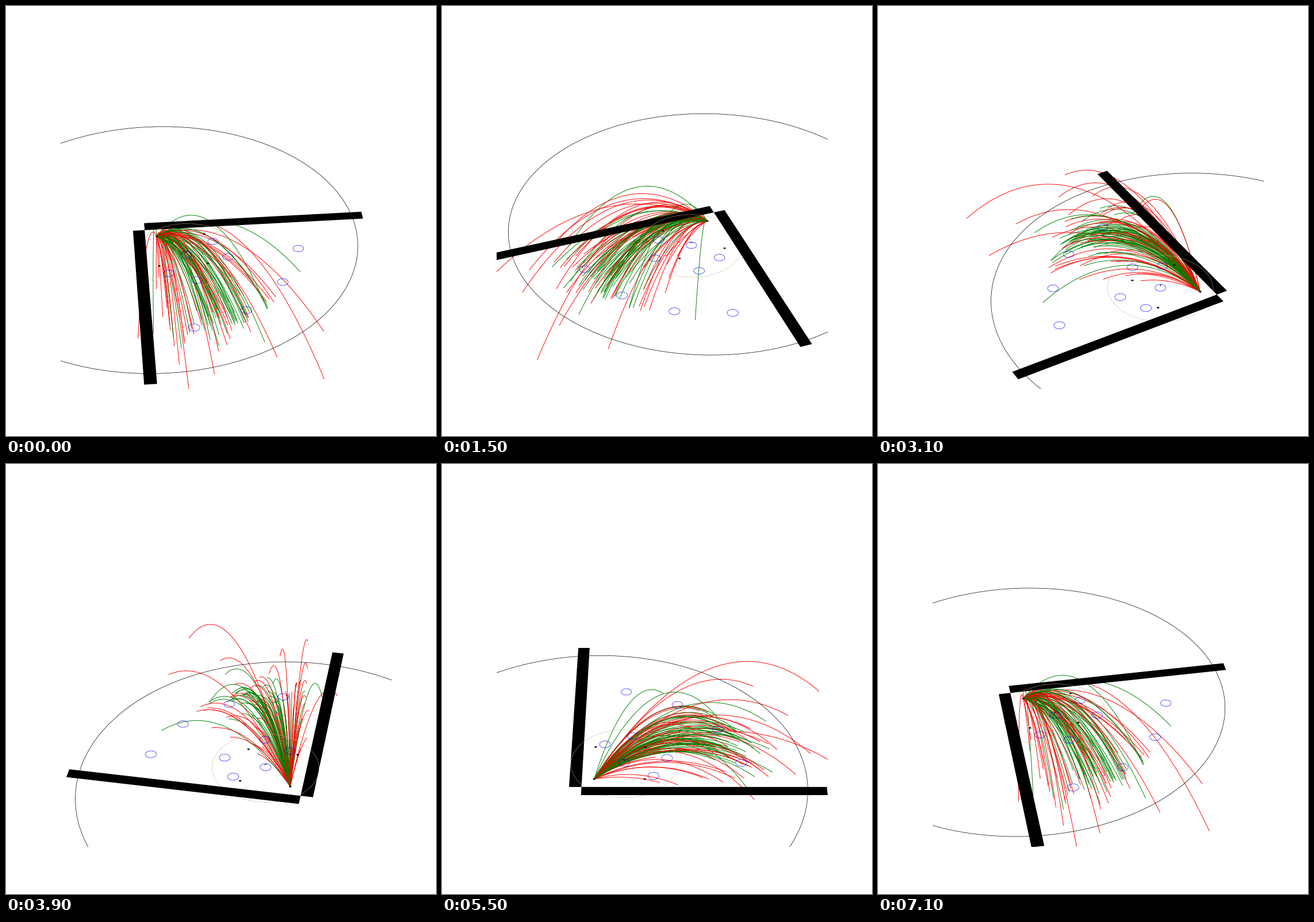
A matplotlib script that plays this animation: 748x748 px, repeating every 7.2 s.

```python
import numpy as np
import matplotlib.pyplot as plt
from matplotlib.animation import FuncAnimation
from matplotlib.collections import LineCollection
from matplotlib.patches import Polygon

SIZE, DPI = 748, 100
FRAMES, STEP = 72, 5          # one full turn, degrees per frame
ELEV = np.radians(36.94)
DIST = 3113.4                 # camera distance
CENTER = 125.6                # turning point, on both field axes
GROUND = -132.7               # ground level below the turning point
RAISED = 6.0                  # height of plate, bases and foul strips
VIEW_X, VIEW_Y = 391.2, 369.9
BASE = 87.3                   # distance between bases
MOUND = 51                    # mound position, on both field axes


def project(points, frame):
    """Field coordinates (x, y, z) to stage pixels, with the depth."""
    turn = np.radians(275 - STEP * frame)
    x, y = points[..., 0] - CENTER, points[..., 1] - CENTER
    z = points[..., 2] + GROUND
    u = x * np.cos(turn) - y * np.sin(turn)
    v = x * np.sin(turn) + y * np.cos(turn)
    depth = v * np.cos(ELEV) - z * np.sin(ELEV)
    up = v * np.sin(ELEV) + z * np.cos(ELEV)
    k = 1 + depth / DIST
    return np.stack([VIEW_X + u / k, VIEW_Y - up / k], axis=-1), depth


def flat(xy, z):
    xy = np.asarray(xy, float)
    return np.column_stack([xy, np.full(len(xy), z)])


def circle(cx, cy, r, n=160):
    t = np.linspace(0, 2 * np.pi, n, endpoint=False)
    return flat(np.column_stack([cx + r * np.cos(t), cy + r * np.sin(t)]), 0)


def rect(x0, y0, x1, y1):
    return flat([(x0, y0), (x1, y0), (x1, y1), (x0, y1)], RAISED)


def flight(x, y, height, n=48):
    """Parabola from the plate to its landing spot."""
    t = np.linspace(0, 1, n)
    z = RAISED * (1 - t) + 4 * height * t * (1 - t)
    return np.column_stack([x * t, y * t, z])


def random_flights(rng, angles, length, spread, limits):
    """Longer balls fly higher, in proportion to the length squared."""
    r = np.clip(rng.normal(length, spread, len(angles)), *limits)
    a = np.radians(angles)
    height = 0.00078 * r**2 * rng.uniform(0.75, 1.3, len(angles))
    return [flight(*h) for h in zip(r * np.cos(a), r * np.sin(a), height)]


# the few balls that stand out: landing x, y and height of the arc
far_outs = [(406, 257, 146), (436, 31, 96), (379, 76, 112),
            (285, 272, 88), (345, 185, 92), (275, -47, 83)]
far_hits = [(119, 251, 71), (216, 181, 113), (265, -20, 107), (304, 168, 95)]

rng = np.random.default_rng(11)
outs = [flight(*p) for p in far_outs]
outs += random_flights(rng, rng.uniform(-5, 50, 40), 235, 70, (110, 350))
hits = [flight(*p) for p in far_hits]
hits += random_flights(rng, rng.normal(22, 9, 44), 268, 32, (180, 320))
arcs = np.array(outs + hits)
colors = np.array(["red"] * len(outs) + ["green"] * len(hits))
order = rng.permutation(len(arcs))
arcs, colors = arcs[order], colors[order]

fig = plt.figure(figsize=(SIZE / DPI, SIZE / DPI), dpi=DPI, facecolor="white")
left, bottom, side = 95.4, 82.28, 576
ax = fig.add_axes([left / SIZE, bottom / SIZE, side / SIZE, side / SIZE])
ax.set_xlim(left, left + side)
ax.set_ylim(SIZE - bottom, SIZE - bottom - side)
ax.set_axis_off()

paths = LineCollection([], colors=list(colors), linewidths=0.68, zorder=2)
ax.add_collection(paths, autolim=False)

shapes = []


def add_shape(points, **style):
    patch = Polygon(np.zeros((3, 2)), **style)
    ax.add_patch(patch)
    shapes.append((patch, points))


def outline(points, color, width):
    add_shape(points, fill=False, edgecolor=color, linewidth=width)


def solid(points):
    add_shape(points, facecolor="black", linewidth=0)


outline(circle(0, 0, 368.4, 400), "black", 0.5)
outline(circle(MOUND, MOUND, 93.4), "tan", 0.35)

# fielders: four deep on an arc, two infield pairs mirrored, one on the mound
deep = np.radians(11.25 + 22.5 * np.arange(4))
spots = [(260.5 * np.cos(a), 260.5 * np.sin(a)) for a in deep]
for x, y in [(102.3, 15.8), (125.8, 64.2)]:
    spots += [(x, y), (y, x)]
spots.append((MOUND, MOUND))
for x, y in spots:
    outline(circle(x, y, 9.6, 60), "blue", 0.45)

# foul strips
INNER, OUTER = 21.0, 42.4
solid(rect(-INNER, -OUTER, 400.2, -INNER))
solid(rect(-OUTER, -INNER, -INNER, 384.8))

# plate and bases
HALF = 1.9
for x in (0, BASE):
    for y in (0, BASE):
        solid(rect(x - HALF, y - HALF, x + HALF, y + HALF))

# pitching rubber, across the diagonal
along, across = np.array([2.2, -2.2]), np.array([0.4, 0.4])
solid(flat([MOUND - along - across, MOUND + along - across,
            MOUND + along + across, MOUND - along + across], RAISED))


def draw(frame):
    paths.set_segments(list(project(arcs, frame)[0]))
    for patch, points in shapes:
        xy, depth = project(points, frame)
        patch.set_xy(xy)
        patch.set_zorder(10 - depth.min() / 1000)   # nearer shapes on top
    return [paths] + [patch for patch, _ in shapes]


anim = FuncAnimation(fig, draw, frames=FRAMES, interval=100,
                     init_func=lambda: draw(0), repeat=True, blit=False)
plt.show()
```
